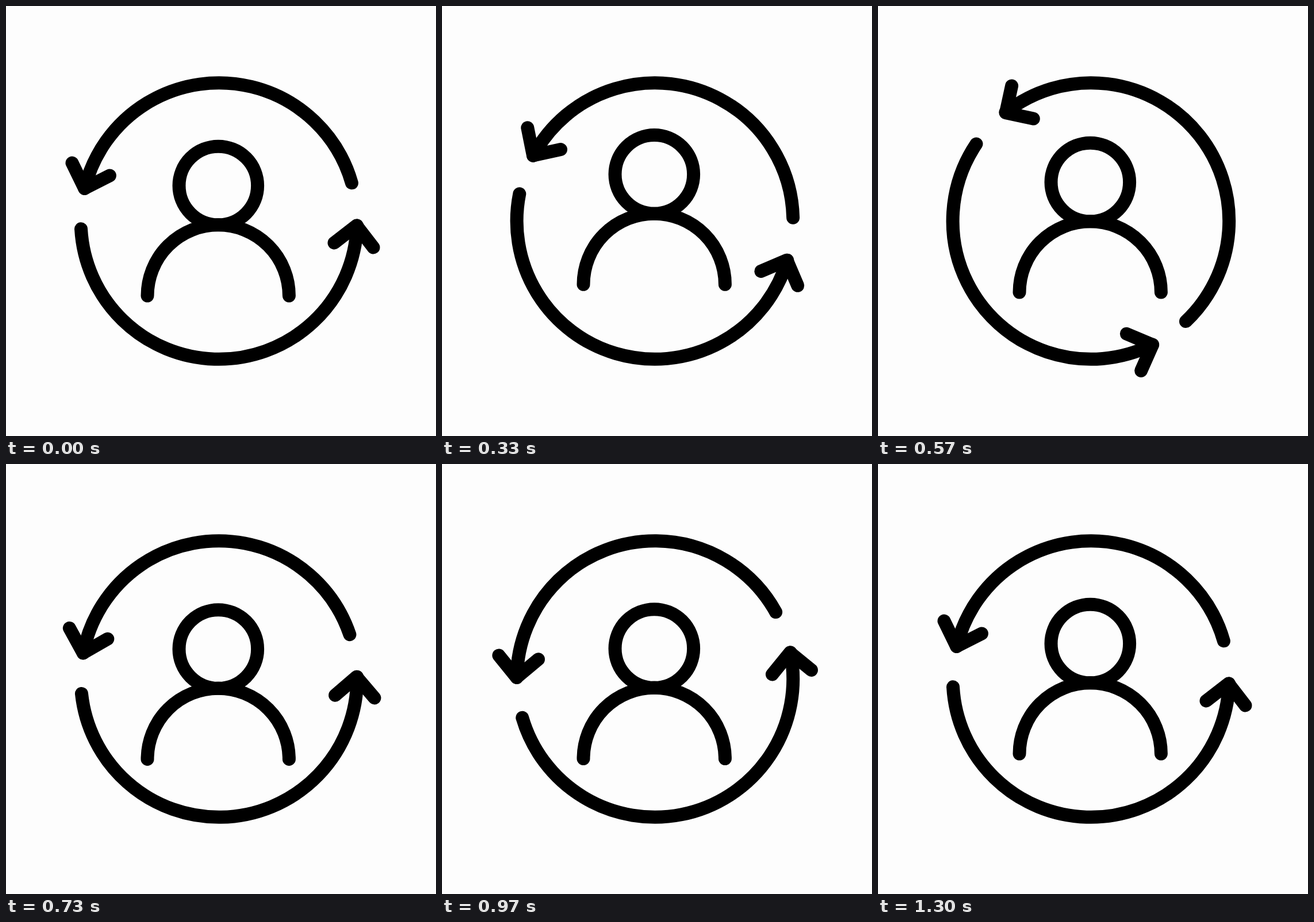
An HTML page for the animation above (1.33 s loop, 748 by 748 pixels).

```html
<!DOCTYPE html>
<html lang="en">
<head>
<meta charset="utf-8">
<title>User refresh</title>
<style>
  html, body { margin: 0; width: 100%; height: 100%; overflow: hidden; background: #fdfdfd; }
  svg { display: block; width: 100vw; height: 100vh; }
  g { fill: none; stroke: #000; stroke-width: 23; stroke-linecap: round; stroke-linejoin: round; }
</style>
</head>
<body>
<svg viewBox="0 0 748 748">
  <g id="arrows" transform="translate(370.4 374)">
    <circle r="240.3" pathLength="360" stroke-dasharray="150.4 209.6" transform="rotate(193.6)"/>
    <path d="M-255.4-101L-233.8-56.7L-190-79"/>
    <circle r="240.3" pathLength="360" stroke-dasharray="174.8 185.2" transform="rotate(1.9)"/>
    <path d="M200.6 38L239.3 8L268.6 46"/>
  </g>
  <g id="person">
    <circle cx="369.3" cy="312.5" r="68.3"/>
    <path d="M246 504A123.2 123.2 0 0 1 492.4 504"/>
  </g>
</svg>
<script>
  const LOOP = 1330;
  const arrows = document.getElementById('arrows');
  const person = document.getElementById('person');

  // Bezier easing with flat ends: control points (x1, 0) and (x2, 1).
  const ease = (x1, x2) => x => {
    let lo = 0, hi = 1;
    for (let i = 0; i < 30; i++) {
      const s = (lo + hi) / 2, r = 1 - s;
      if (3 * r * r * s * x1 + 3 * r * s * s * x2 + s ** 3 < x) lo = s;
      else hi = s;
    }
    return lo * lo * (3 - 2 * lo);
  };

  // Each key: [step, value, easing towards it].
  const track = keys => step => {
    for (let i = 1; i < keys.length; i++) {
      const [from, a] = keys[i - 1], [to, b, curve] = keys[i];
      if (step < to) return a + (b - a) * curve((step - from) / (to - from));
    }
    return keys[keys.length - 1][1];
  };

  const settle = ease(0.364, 0.636);
  const angle = track([
    [0, 0], [9, 15.3, ease(0.3, 0.4)], [26, -376, ease(0.849, 0.125)], [36.5, -360, settle]
  ]);
  const lift = track([
    [0, 0], [9, -19.7, ease(0.3, 0.31)], [26, 10.5, ease(0.812, 0.129)], [36.5, 0, settle]
  ]);

  // Poses advance 30 times a second, on whole hundredths.
  const stepAt = ms => Math.floor((10 * Math.floor(ms / 10) + 5) * 0.03);

  let start;
  function draw(now) {
    start ??= now;
    const step = stepAt((now - start) % LOOP);
    arrows.setAttribute('transform', `translate(370.4 374) rotate(${angle(step)})`);
    person.setAttribute('transform', `translate(0 ${lift(step)})`);
    requestAnimationFrame(draw);
  }
  requestAnimationFrame(draw);
</script>
</body>
</html>
```
